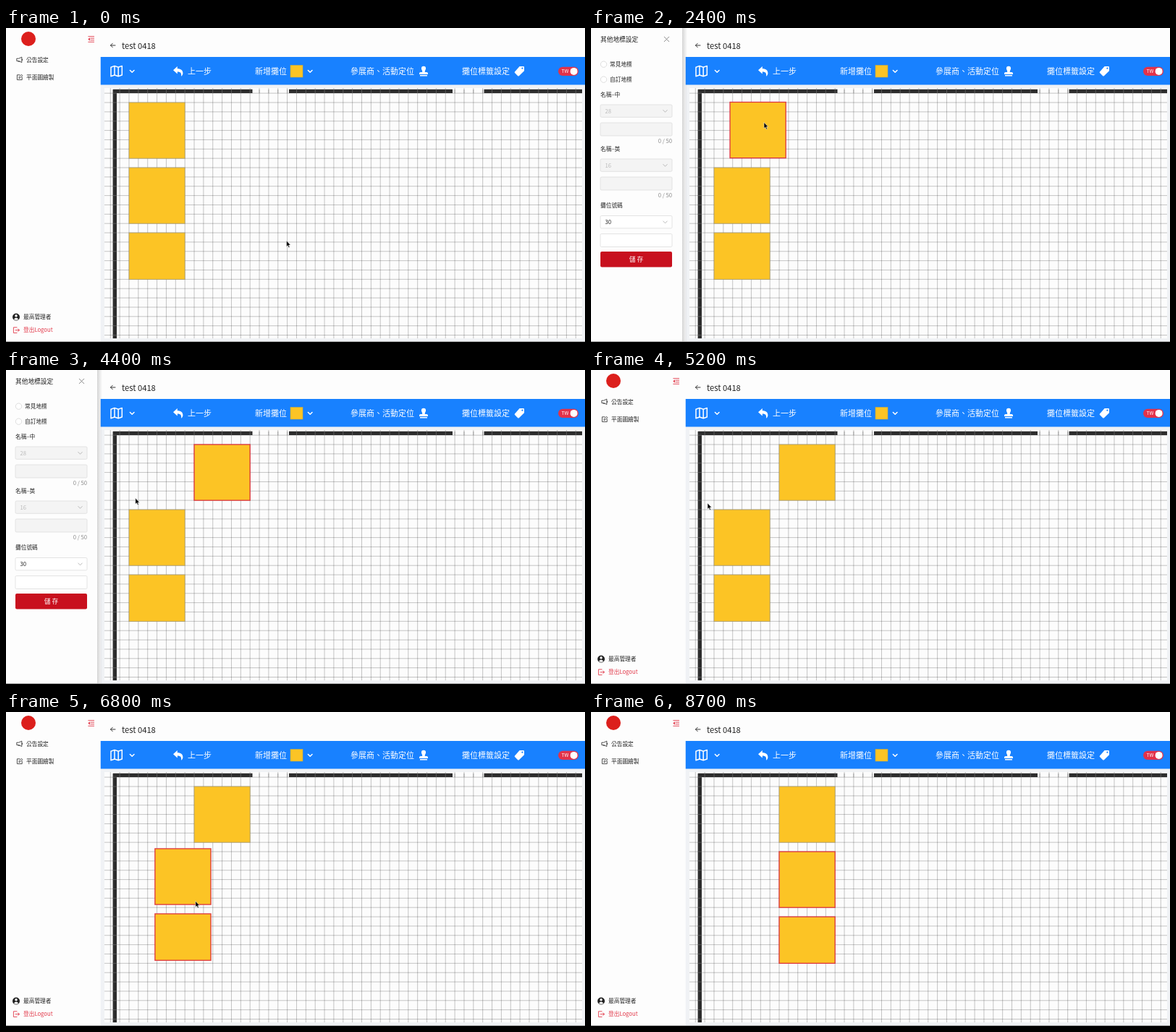
Recreate the animation shown at these times as an HTML page. Size 800 by 434 pixels, loop 8800 ms.

```html
<!DOCTYPE html>
<html>
<head>
<meta charset="utf-8">
<title>Floor plan editor</title>
<style>
html, body { margin: 0; width: 100%; height: 100%; overflow: hidden; background: #fdfdfd; }
svg { display: block; width: 100vw; height: 100vh; }
text { font-family: "Noto Sans CJK TC", "Noto Sans CJK", "Noto Sans CJK JP", "Noto Sans", sans-serif; white-space: pre; }
.line { fill: none; stroke-linecap: round; stroke-linejoin: round; }
.booth { fill: #fcc425; stroke: #a89a6c; stroke-width: .8; }
.booth.on { stroke: #dd3540; stroke-width: 1.3; }
</style>
</head>
<body>
<svg viewBox="0 0 800 434">
  <rect width="800" height="434" fill="#fdfdfd"/>
  <rect x="130.5" y="78" width="670" height="356" fill="#f0f2f5"/>
  <rect x="136" y="83" width="660" height="346" fill="#fcfcfc"/>
  <path id="grid" stroke="#000" stroke-opacity=".29" stroke-width=".8"/>
  <path d="M148 87.4H340.5M391 87.4H617M660.5 87.4H796M150.3 85V429" stroke="#2d2d2d" stroke-width="5.4"/>
  <path id="seams" stroke="#777" stroke-width=".6"/>
  <g id="booths"></g>

  <rect x="130.5" y="40" width="669.5" height="38.5" fill="#1881ff"/>
  <path class="line" d="M151 24H144.5M147.3 21.2L144.5 24L147.3 26.8" stroke="#222" stroke-width=".9"/>
  <g class="line" stroke="#fff" stroke-width="1.5">
    <path d="M145 54.2L150 52.4L155.2 54.2L160.3 52.4V65L155.2 66.8L150 65L145 66.8ZM150 52.4V65M155.2 54.2V66.8"/>
    <path d="M171.4 58.5L174.2 61.2L177 58.5M417.4 58.5L420.2 61.2L423 58.5"/>
  </g>
  <g fill="#fff">
    <path d="M231 58.3L236.8 53V56.2C242 56.2 244.4 58.8 244.4 62.2C244.4 64.3 243.4 66 242 66.8C242.8 62.6 241.2 60.6 236.8 60.6V63.6Z"/>
    <path d="M575.2 61C575.6 58.6 573.9 57.6 573.9 55.9A3.1 3.1 0 0 1 580.1 55.9C580.1 57.6 578.4 58.6 578.8 61H581.2Q583 61 583 63V64H571V63Q571 61 572.8 61ZM572 65H582V66.6H572Z"/>
    <path fill-rule="evenodd" d="M709.6 53H714.8Q716 53 716 54.2V59.2L708.8 66.2Q708 66.9 707.2 66.2L703 62Q702.3 61.2 703 60.4ZM713.4 54.6A1.1 1.1 0 1 0 713.4 56.8A1.1 1.1 0 1 0 713.4 54.6Z"/>
  </g>
  <rect x="393" y="51.5" width="17" height="16.5" fill="#fcc425" stroke="#c9a83c" stroke-width=".6"/>
  <rect x="763" y="53.8" width="28" height="12.2" rx="6.1" fill="#e2324a"/>
  <circle cx="784.6" cy="59.9" r="5" fill="#fff"/>
  <g id="barText" fill="#fff"></g>

  <rect width="130.5" height="434" fill="#fdfdfd"/>
  <circle cx="31" cy="15" r="10" fill="#dc1f1c"/>
  <g class="line" stroke="#e23a4b" stroke-width=".9">
    <path d="M113.8 11.7H121.6M117 14.2H121.6M117 16.8H121.6M113.8 19.3H121.6"/>
    <path d="M115.3 14.2L113.8 15.5L115.3 16.8Z" fill="#e23a4b"/>
    <path d="M15 413.8H10.4V421.4H15M13 417.6H18.4M16.6 415.8L18.4 417.6L16.6 419.4"/>
  </g>
  <g class="line" stroke="#333" stroke-width=".85">
    <path d="M15.2 42.2H17.6L21.8 40.2V47.6L17.6 45.6H15.2ZM16.6 45.7Q16.8 47.6 18.6 46.2M22.6 43.2V44.6"/>
    <path d="M19 64.8H15.4V71.6H22.2V68M18 69.2L18.3 67.4L21.4 64.3L22.8 65.7L19.7 68.8Z"/>
  </g>
  <circle cx="14" cy="399.5" r="5" fill="#222"/>
  <circle cx="14" cy="397.8" r="1.7" fill="#fff"/>
  <path d="M10.9 402.4Q14 398.6 17.1 402.4Q14 405 10.9 402.4Z" fill="#fff"/>
  <g id="sideText"></g>

  <g id="drawer">
    <rect x="126" width="7" height="434" fill="url(#shade)"/>
    <rect width="126" height="434" fill="#fdfdfd"/>
    <path class="line" d="M101.2 12.2L107.8 18.8M107.8 12.2L101.2 18.8" stroke="#777" stroke-width=".8"/>
    <g id="form"></g>
    <rect x="13" y="309" width="99" height="21.6" rx="2" fill="#c8101e"/>
    <g id="formText"></g>
  </g>
  <defs>
    <linearGradient id="shade">
      <stop offset="0" stop-color="#000" stop-opacity=".16"/>
      <stop offset="1" stop-color="#000" stop-opacity="0"/>
    </linearGradient>
  </defs>
  <rect y="433" width="800" height="1" fill="#9a9a9a"/>
  <path id="cursor" d="M0 0V8.2L1.8 6.6L3.1 9.5L4.5 8.9L3.2 6.1H5.7Z" fill="#000" stroke="#fff" stroke-width=".5"/>
</svg>
<script>
const $ = id => document.getElementById(id);
const CELL = 12.86, LOOP = 8800, STEP = 100;

// Text is placed by its left edge and vertical centre.
function label(group, x, cy, size, str, attrs = '') {
  $(group).insertAdjacentHTML('beforeend',
    `<text x="${x}" y="${cy + size * .375}" font-size="${size}" ${attrs}>${str}</text>`);
}

function drawGrid() {
  let grid = '', seams = '';
  for (let x = 170 - 2 * CELL; x < 796; x += CELL) {
    grid += `M${x} 83V429`;
    if (x > 150) seams += `M${x} 85V90`;
  }
  for (let y = 103 - CELL; y < 429; y += CELL) {
    grid += `M136 ${y}H796`;
    seams += `M147.8 ${y}H152.8`;
  }
  $('grid').setAttribute('d', grid);
  $('seams').setAttribute('d', seams);
}

function drawText() {
  label('sideText', 160, 24.3, 11.2, 'test 0418', 'fill="#222"');
  label('barText', 251, 59.8, 11, '上一步');
  label('barText', 344, 59.8, 11, '新增攤位');
  label('barText', 476, 59.8, 11, '參展商、活動定位');
  label('barText', 630, 59.8, 11, '攤位標籤設定');
  label('barText', 767.5, 60, 6.6, 'TW');
  label('sideText', 28, 44, 7.7, '公告設定', 'fill="#222"');
  label('sideText', 28, 68, 7.7, '平面圖繪製', 'fill="#222"');
  label('sideText', 24, 399.5, 7.7, '最高管理者', 'fill="#222" font-weight="500"');
  label('sideText', 24, 417.5, 7.7, '登出Logout', 'fill="#e23a4b"');
}

function drawForm() {
  const ink = 'fill="#222"', grey = 'fill="#8c8c8c"', pale = 'fill="#bbb"';
  const box = (y, h, fill) => $('form').insertAdjacentHTML('beforeend',
    `<rect x="13" y="${y}" width="99" height="${h}" rx="1.5" fill="${fill}" stroke="#d9d9d9" stroke-width=".7"/>`);
  const field = (y, name, value, off) => {
    const fill = off ? '#f4f4f4' : '#fff';
    label('formText', 13, y, 7.7, name, ink);
    box(y + 14, 17.3, fill);
    box(y + 39, 18, fill);
    label('formText', 19.5, y + 22.8, 7.7, value, off ? pale : ink);
    $('form').insertAdjacentHTML('beforeend',
      `<path class="line" d="M99.8 ${y + 21.5}l2.7 2.8l2.7 -2.8" stroke="#aaa" stroke-width=".8"/>`);
    if (off) label('formText', 112, y + 64, 7.7, '0 / 50', grey + ' text-anchor="end"');
  };
  label('formText', 13, 15.5, 8.7, '其他地標設定', ink);
  [[50.2, '常見地標'], [71.2, '自訂地標']].forEach(([y, name]) => {
    $('form').insertAdjacentHTML('beforeend',
      `<circle cx="17.5" cy="${y}" r="4.2" fill="#fff" stroke="#d0d0d0" stroke-width=".7"/>`);
    label('formText', 26, y, 7.7, name, ink + ' font-weight="500"');
  });
  field(92, '名稱–中', '28', true);
  field(167, '名稱–英', '16', true);
  field(245.5, '攤位號碼', '30', false);
  label('formText', 62.5, 320, 8.7, '儲 存', 'fill="#fff" text-anchor="middle"');
}

const booths = [[103, 6], [103 + 7 * CELL, 6], [103 + 14 * CELL, 5]].map(([y, rows]) => {
  $('booths').insertAdjacentHTML('beforeend',
    `<rect class="booth" x="170" y="${y}" width="${6 * CELL}" height="${rows * CELL}"/>`);
  return $('booths').lastChild;
});

// Pointer stops: time, x, y
const stops = [
  [0, 387.5, 294], [200, 383, 288], [400, 383, 288], [900, 217, 131],
  [2000, 217, 131], [3200, 302, 129], [3700, 302, 129], [4600, 161, 184],
  [5200, 161, 184], [5800, 262, 356], [6100, 226, 265.5], [6300, 226, 265.5],
  [7400, 309, 256], [7900, 309, 256], [8400, 420, -14], [LOOP, 420, -14]
];

const clamp = v => Math.min(1, Math.max(0, v));
const smooth = v => v * v * (3 - 2 * v);
const easeOut = v => 1 - (1 - clamp(v)) ** 4;

function pointer(t) {
  const i = stops.findIndex(s => s[0] > t);
  const [t0, x0, y0] = stops[i - 1], [t1, x1, y1] = stops[i];
  const k = smooth((t - t0) / (t1 - t0));
  return [x0 + (x1 - x0) * k, y0 + (y1 - y0) * k];
}

// A booth follows the pointer while held and snaps to the grid on release.
function drag(t, start, end) {
  if (t < start) return [0, 0];
  if (t >= end) return [7 * CELL, 0];
  const [x0, y0] = pointer(start), [x, y] = pointer(t);
  return [x - x0, y - y0];
}

const move = (el, [x, y]) => el.setAttribute('transform', `translate(${x} ${y})`);

function frame(now) {
  const t = Math.floor(now % LOOP / STEP) * STEP;
  const first = drag(t, 2000, 3200), rest = drag(t, 6300, 7400);
  booths.forEach((booth, i) => {
    move(booth, i ? rest : first);
    booth.classList.toggle('on', i ? t >= 5800 : t >= 1000 && t < 4900);
  });
  const open = easeOut((t - 1000) / 300) - easeOut((t - 4800) / 300);
  move($('drawer'), [(open - 1) * 134, 0]);
  move($('cursor'), pointer(t));
  requestAnimationFrame(frame);
}

drawGrid();
drawText();
drawForm();
requestAnimationFrame(frame);
</script>
</body>
</html>
```
